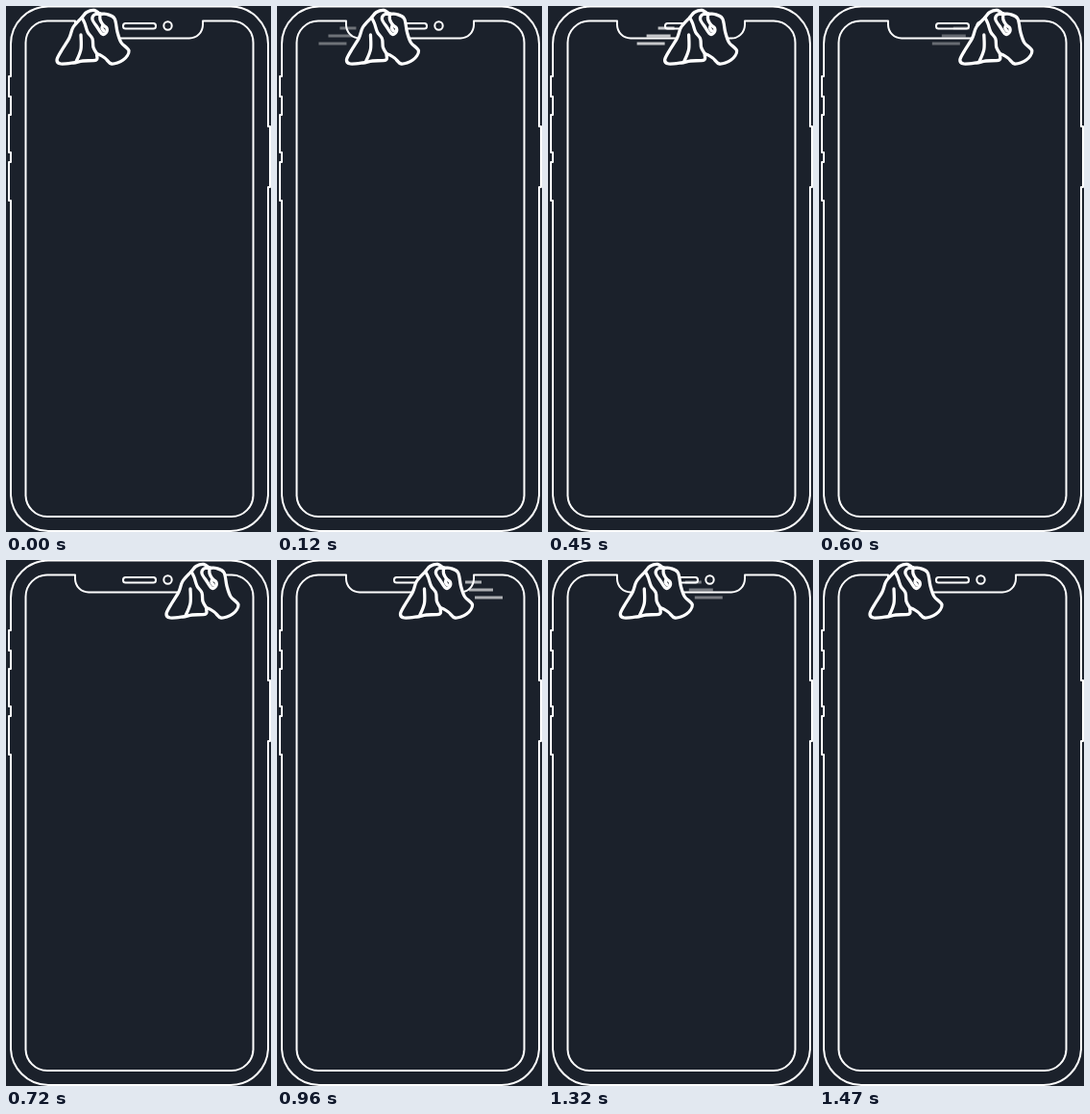
Animation of 276x546 px, one loop 1.68 s. Source, as an HTML page:

```html
<!DOCTYPE html>
<html lang="en">
<head>
<meta charset="utf-8">
<title>Wiping the notch</title>
<style>
  html, body { margin: 0; height: 100%; overflow: hidden; background: #1b212b; }
  svg { display: block; width: 100vw; height: 100vh; }
</style>
</head>
<body>
<svg viewBox="0 0 276 546" fill="none" stroke="#fff" stroke-width="2" stroke-linejoin="round">
  <!-- body with side buttons -->
  <path d="M44 .5H234a39 39 0 0 1 39 39V125h2v63h-2V506a39 39 0 0 1-39 39H44a39 39 0 0 1-39-39
    V202h-2v-40h2v-10h-2v-39h2v-19h-2v-21h2V39.5a39 39 0 0 1 39-39Z"/>
  <!-- screen with notch -->
  <path d="M43 15.5H72v4a14 14 0 0 0 14 14H191a14 14 0 0 0 14-14v-4h30a22.5 22.5 0 0 1 22.5 22.5
    V507.5a22.5 22.5 0 0 1-22.5 22.5H43a22.5 22.5 0 0 1-22.5-22.5V38a22.5 22.5 0 0 1 22.5-22.5Z"/>
  <rect x="122" y="18" width="34" height="5.5" rx="2.5"/>
  <circle cx="168.5" cy="20.5" r="4.2"/>
  <g id="wiper">
    <path id="trail" stroke-width="3" d="M46 23h17M34 31h25M24 39h29"/>
    <g id="hand" stroke-width="3.3" stroke-linecap="round"></g>
  </g>
</svg>
<script>
  const LOOP = 1680, STEP = 30;
  const MIDDLE = 53.5, FAR = 114;   // hand offsets
  const MIRROR = 183.5;             // flips the trail to the other side of the hand
  const [wiper, trail, hand] = ['wiper', 'trail', 'hand'].map(id => document.getElementById(id));

  // Smooth curve through a string of "x,y" points
  function curve(text, closed) {
    const pts = text.split(' ').map(p => p.split(',').map(Number));
    const n = pts.length;
    const at = i => pts[closed ? (i + n) % n : Math.max(0, Math.min(n - 1, i))];
    const handle = (i, sign) => at(i).map((v, k) => v + sign * (at(i + 1)[k] - at(i - 1)[k]) / 6);
    let d = 'M' + pts[0];
    for (let i = 0; i < (closed ? n : n - 1); i++) {
      d += `C${handle(i, 1)} ${handle(i + 1, -1)} ${at(i + 1)}`;
    }
    return `<path d="${d}" fill="${closed ? '#1b212b' : 'none'}"/>`;
  }

  hand.innerHTML =
    curve('53,56 58,46 66,33 70,22 79,12 84,6.5 92,4.5 98,8 105,8.5 113,13 116,27 120,38 ' +
          '128,46.5 122,56 110,60 103,54 95,50 94,56 80,57 70,59 57,60', true) +
    curve('79,12 82,18 85,27 90,34 91,43 95,50') +
    curve('98,8 92,9 90,14 95,22 100,29 104,28 105,23 101,19.5 98,14 98,8') +
    curve('101,19.5 100,23 102,26') +
    curve('78,30 78,45 73,58');

  const ramp = (t, from, to) => Math.max(0, Math.min(1, (t - from) / (to - from)));

  function draw() {
    const t = Math.floor(performance.now() % LOOP / STEP) * STEP;
    const near = ramp(t, 0, 330) - ramp(t, 1110, 1470);
    const far = ramp(t, 360, 720) - ramp(t, 750, 1080);
    const returning = t >= 750;
    wiper.setAttribute('transform', `translate(${MIDDLE * near + (FAR - MIDDLE) * far})`);
    trail.setAttribute('transform', returning ? `translate(${MIRROR}) scale(-1 1)` : '');
    trail.setAttribute('opacity', near - far);
    requestAnimationFrame(draw);
  }
  draw();
</script>
</body>
</html>
```
